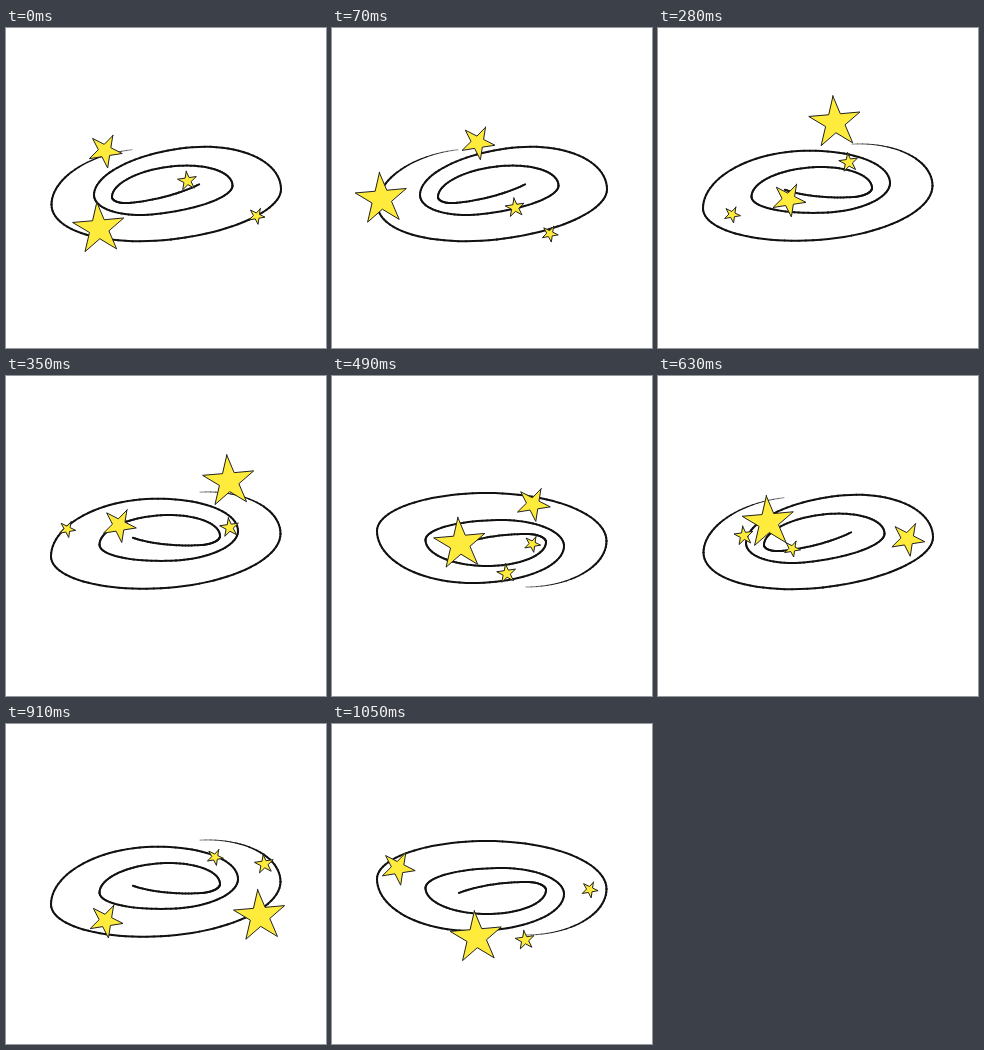
Recreate the animation shown at these times as an HTML page with a canvas. Size 320 by 320 pixels, loop 1120 ms.

```html
<!DOCTYPE html>
<html lang="en">
<head>
<meta charset="utf-8">
<title>Dizzy stars</title>
<style>
html, body { margin: 0; width: 100%; height: 100%; overflow: hidden; background: #fff; }
canvas { display: block; width: 320px; height: 320px; }
</style>
</head>
<body>
<canvas id="stage" width="320" height="320"></canvas>
<script>
const ctx = document.getElementById('stage').getContext('2d');
const STEP = 70, STEPS = 16, RAD = Math.PI / 180;

// Extremes of the spiral from its outer tail inward, joined by quarter ellipses.
const turns = [
  [126, 211], [45.5, 165], [165, 117], [275, 155], [180, 207], [88, 170],
  [150, 144], [226.5, 164], [165, 190], [106, 166], [125, 158], [225, 199]
];

// Each pose lasts two steps.
const poses = [
  { flipX: 1, flipY: -1, slope: -.11 },
  { flipX: 1, flipY: 1, slope: 0 },
  { flipX: -1, flipY: -1, slope: -.055 },
  { flipX: -1, flipY: 1, slope: 0 }
];

// Each star winds clockwise outward; angles and radii are keyed every KEY steps.
const KEY = 3;
const stars = [
  { size: 8.5, turn: 26, start: 7,
    angle: [14, 200, 309, 389, 475, 591], radius: [41, 34, 77, 103, 97, 104] },
  { size: 10, turn: -8, start: 0,
    angle: [-44, 240, 384, 545, 650, 793], radius: [29, 60, 69, 75, 104, 111] },
  { size: 17.5, turn: 27, start: 3,
    angle: [90, 262, 360, 457, 562, 650], radius: [14, 71, 89, 86, 102, 95] },
  { size: 27, turn: -5, start: 7,
    angle: [163, 246, 392, 492, 610, 680], radius: [34, 73, 110, 101, 139, 124] }
];

function spiralPoints() {
  const points = [], n = 24;
  for (let i = 0; i < turns.length - 1; i++) {
    const [px, py] = turns[i], [qx, qy] = turns[i + 1];
    const sweep = i === turns.length - 2 ? .75 : Math.PI / 2;
    for (let k = 0; k <= n; k++) {
      const s = Math.sin(k / n * sweep), c = Math.cos(k / n * sweep);
      points.push(i % 2 === 0
        ? [px + (qx - px) * s, qy + (py - qy) * c]
        : [qx + (px - qx) * c, py + (qy - py) * s]);
    }
  }
  return points;
}
const spiral = spiralPoints();

// Smooth curve through evenly spaced keys, continued straight past both ends.
function along(keys, t) {
  const i = Math.min(Math.floor(t), keys.length - 2), u = t - i;
  const b = keys[i], c = keys[i + 1];
  const a = keys[i - 1] ?? 2 * b - c, d = keys[i + 2] ?? 2 * c - b;
  return b + u / 2 * (c - a + u * (2 * a - 5 * b + 4 * c - d + u * (3 * (b - c) + d - a)));
}

function drawSpiral({ flipX, flipY, slope }) {
  ctx.strokeStyle = '#111';
  ctx.lineCap = 'round';
  const place = ([x, y]) => {
    const u = flipX * (x - 160);
    return [160 + u, 164.5 + flipY * (y - 164.5) + slope * u];
  };
  for (let i = 1; i < spiral.length; i++) {
    ctx.lineWidth = Math.min(2, .4 + i * .1);
    ctx.beginPath();
    ctx.moveTo(...place(spiral[i - 1]));
    ctx.lineTo(...place(spiral[i]));
    ctx.stroke();
  }
}

function drawStar({ size, turn, start, angle, radius }, step) {
  const t = (step - start + STEPS) % STEPS / KEY;
  const a = along(angle, t) * RAD, r = along(radius, t);
  const x = 160.5 + r * Math.cos(a), y = 163 + r / 2 * Math.sin(a);
  ctx.beginPath();
  for (let i = 0; i < 10; i++) {
    const reach = i % 2 ? size * .38 : size;
    const tip = (turn - 90 + i * 36) * RAD;
    ctx.lineTo(x + reach * Math.cos(tip), y + reach * Math.sin(tip));
  }
  ctx.closePath();
  ctx.fillStyle = '#ffeb3b';
  ctx.fill();
  ctx.strokeStyle = '#222';
  ctx.lineWidth = 1;
  ctx.stroke();
}

function draw(step) {
  ctx.fillStyle = '#fff';
  ctx.fillRect(0, 0, 320, 320);
  drawSpiral(poses[Math.floor(step / 2) % poses.length]);
  stars.forEach(star => drawStar(star, step));
}

const begin = performance.now();
function tick() {
  draw(Math.floor((performance.now() - begin) / STEP) % STEPS);
  requestAnimationFrame(tick);
}
tick();
</script>
</body>
</html>
```
